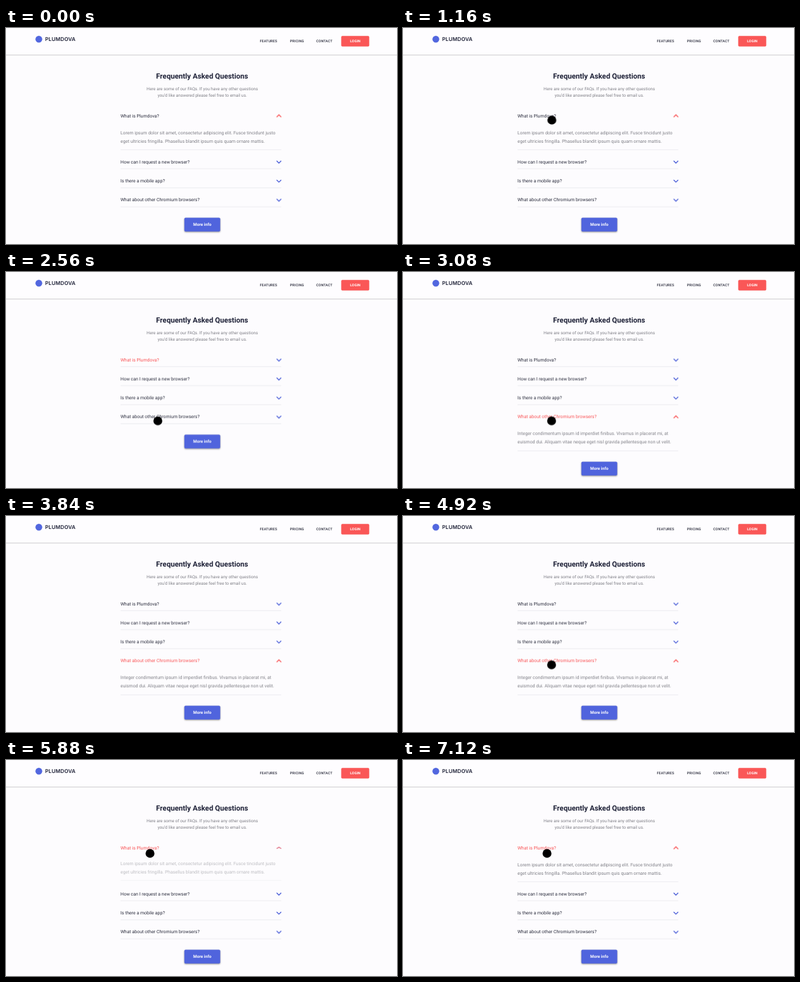
Write an HTML page that moves like this. It is 600x333 px and loops after 7.16 s.

```html
<!DOCTYPE html>
<html lang="en">
<head>
<meta charset="utf-8">
<title>FAQ accordion</title>
<style>
  html, body { margin: 0; width: 100%; height: 100%; overflow: hidden; background: #fdfcfe; }
  svg {
    --ink: #2b2d3d; --red: #f95254; --blue: #4c5fd8;
    display: block; width: 600px; height: 333px;
    font: 400 6.97px Roboto, sans-serif;
    text-rendering: geometricPrecision;
    fill: var(--ink);
  }
  .bar { fill: #fefdff; filter: drop-shadow(0 .7px 1.1px rgba(0, 0, 0, .46)); }
  .logo { font: 600 8px Inter, sans-serif; letter-spacing: .15px; fill: #1f2238; }
  .nav { font-size: 5.4px; font-weight: 500; letter-spacing: .1px; }
  .mid { text-anchor: middle; }
  .title { font-size: 11.2px; font-weight: 700; fill: #1f2238; }
  .lead { font-size: 6.5px; }
  .lead, .panel { fill: #7f7f86; }
  .line { stroke: #e4e4ea; stroke-width: .7; }
  .chev { fill: none; stroke: var(--blue); stroke-width: 1.35; }
  .more { fill: #5064dd; filter: drop-shadow(0 1px 1.3px rgba(0, 0, 0, .42)); }
  .label { fill: #fff; font-weight: 700; }
  .cta text { font-size: 6.4px; }

  .anim { animation: 7.16s linear infinite; }
  .step { animation-timing-function: step-end; }
  .rest { animation-name: rest; }
  .cta { animation-name: cta; }
  .q1 { animation-name: hover1; }
  .q4 { animation-name: hover4; }
  .c1 { animation-name: flip1; }
  .c4 { animation-name: flip4; }
  .p1 { animation-name: panel1; }
  .p4 { animation-name: panel4; }
  .l1 { animation-name: line1; }
  .l4 { animation-name: line4; }
  .dot { fill: #000; animation-name: travel; }
  .blink { animation-name: blink; }

  /* Layout jumps */
  @keyframes rest {
    0%, 80.03%, 100% { transform: translateY(41.8px); }
    19.55% { transform: none; }
  }
  @keyframes cta {
    0%, 38.27%, 80.03%, 100% { transform: translateY(41.8px); }
    19.55%, 70.25% { transform: none; }
  }
  @keyframes line1 {
    0%, 80.03%, 100% { opacity: 0; }
    19.55% { opacity: 1; }
  }
  @keyframes line4 {
    0%, 70.25%, 100% { opacity: 1; }
    38.27% { opacity: 0; }
  }

  /* Hover colours */
  @keyframes hover1 {
    0%, 16.3% { fill: var(--ink); }
    18.6%, 35.8% { fill: var(--red); }
    38.2%, 77.3% { fill: var(--ink); }
    79.5%, 100% { fill: var(--red); }
  }
  @keyframes hover4 {
    0%, 35.9% { fill: var(--ink); }
    38.3%, 73.8% { fill: var(--red); }
    76%, 100% { fill: var(--ink); }
  }

  /* Opening and closing */
  @keyframes flip1 {
    0%, 18.16% { transform: scaleY(-1); stroke: var(--red); }
    20.9%, 80.03% { transform: none; stroke: var(--blue); }
    82.6%, 100% { transform: scaleY(-1); stroke: var(--red); }
  }
  @keyframes flip4 {
    0%, 38.27% { transform: none; stroke: var(--blue); }
    41%, 68.85% { transform: scaleY(-1); stroke: var(--red); }
    71.6%, 100% { transform: none; stroke: var(--blue); }
  }
  @keyframes panel1 {
    0%, 18.16% { opacity: 1; transform: none; }
    19.55%, 80.03% { opacity: 0; transform: translateY(-4px); }
    84.2%, 100% { opacity: 1; transform: none; }
  }
  @keyframes panel4 {
    0%, 38.27% { opacity: 0; transform: translateY(-4px); }
    42.46%, 68.85% { opacity: 1; transform: none; }
    70.25%, 100% { opacity: 0; transform: translateY(-4px); }
  }

  /* Pointer */
  @keyframes travel {
    0%, 4% { transform: translate(610px, 342px); animation-timing-function: ease-out; }
    16%, 31.5% { transform: translate(228.4px, 142px); animation-timing-function: ease-in-out; }
    35.5%, 36% { transform: translate(233px, 229.5px); }
    39%, 73.3% { transform: translate(228px, 229.5px); animation-timing-function: ease-in-out; }
    78.2%, 100% { transform: translate(221px, 144px); }
  }
  @keyframes blink {
    0%, 58.66%, 100% { opacity: 1; }
    51.12% { opacity: 0; }
  }
</style>
</head>
<body>
<svg viewBox="0 0 600 333">
  <defs>
    <path id="chev" d="M-3.5-1.75 0 1.75 3.5-1.75"/>
    <path id="line" d="M175.8 0H422.3"/>
  </defs>

  <rect class="bar" x="-5" y="-5" width="610" height="46"/>
  <circle cx="50.4" cy="17.3" r="5.2" fill="#5267df"/>
  <text class="logo" x="60" y="20.3">PLUMDOVA</text>
  <g class="nav">
    <text x="389.5" y="22.3">FEATURES</text>
    <text x="435.8" y="22.3">PRICING</text>
    <text x="476" y="22.3">CONTACT</text>
    <rect x="514.4" y="12.2" width="43" height="16.2" rx="1.7" fill="#fa5757"/>
    <text class="label mid" x="536" y="22.3">LOGIN</text>
  </g>

  <g class="mid">
    <text class="title" x="301" y="77.8">Frequently Asked Questions</text>
    <text class="lead" x="301.2" y="95.6">Here are some of our FAQs. If you have any other questions</text>
    <text class="lead" x="301.2" y="105.7">you’d like answered please feel free to email us.</text>
  </g>

  <g>
    <text class="anim q1" x="175.7" y="137.6">What is Plumdova?</text>
    <g transform="translate(418.8 135.6)"><use class="chev anim c1" href="#chev"/></g>
    <g class="anim step l1"><use class="line" href="#line" y="145.9"/></g>
    <g class="panel anim p1">
      <text x="175.7" y="163.5">Lorem ipsum dolor sit amet, consectetur adipiscing elit. Fusce tincidunt justo</text>
      <text x="175.7" y="176.7">eget ultricies fringilla. Phasellus blandit ipsum quis quam ornare mattis.</text>
      <use class="line" href="#line" y="187.7"/>
    </g>
  </g>

  <g class="anim step rest">
    <text x="175.7" y="167">How can I request a new browser?</text>
    <use class="chev" href="#chev" x="418.8" y="164.8"/>
    <use class="line" href="#line" y="175.2"/>

    <text x="175.7" y="196.4">Is there a mobile app?</text>
    <use class="chev" href="#chev" x="418.8" y="194.1"/>
    <use class="line" href="#line" y="204.6"/>

    <text class="anim q4" x="175.7" y="225.7">What about other Chromium browsers?</text>
    <g transform="translate(418.8 223.5)"><use class="chev anim c4" href="#chev"/></g>
    <g class="anim step l4"><use class="line" href="#line" y="233.9"/></g>
    <g class="panel anim p4">
      <text x="175.7" y="251.4">Integer condimentum ipsum id imperdiet finibus. Vivamus in placerat mi, at</text>
      <text x="175.7" y="264.6">euismod dui. Aliquam vitae neque eget nisl gravida pellentesque non ut velit.</text>
      <use class="line" href="#line" y="275.7"/>
    </g>
  </g>

  <g class="anim step cta">
    <rect class="more" x="273.7" y="250.7" width="55" height="21.3" rx="1.8"/>
    <text class="label mid" x="301.2" y="263.7">More info</text>
  </g>

  <g class="anim step blink"><circle class="dot anim" r="6.8"/></g>
</svg>
</body>
</html>
```
